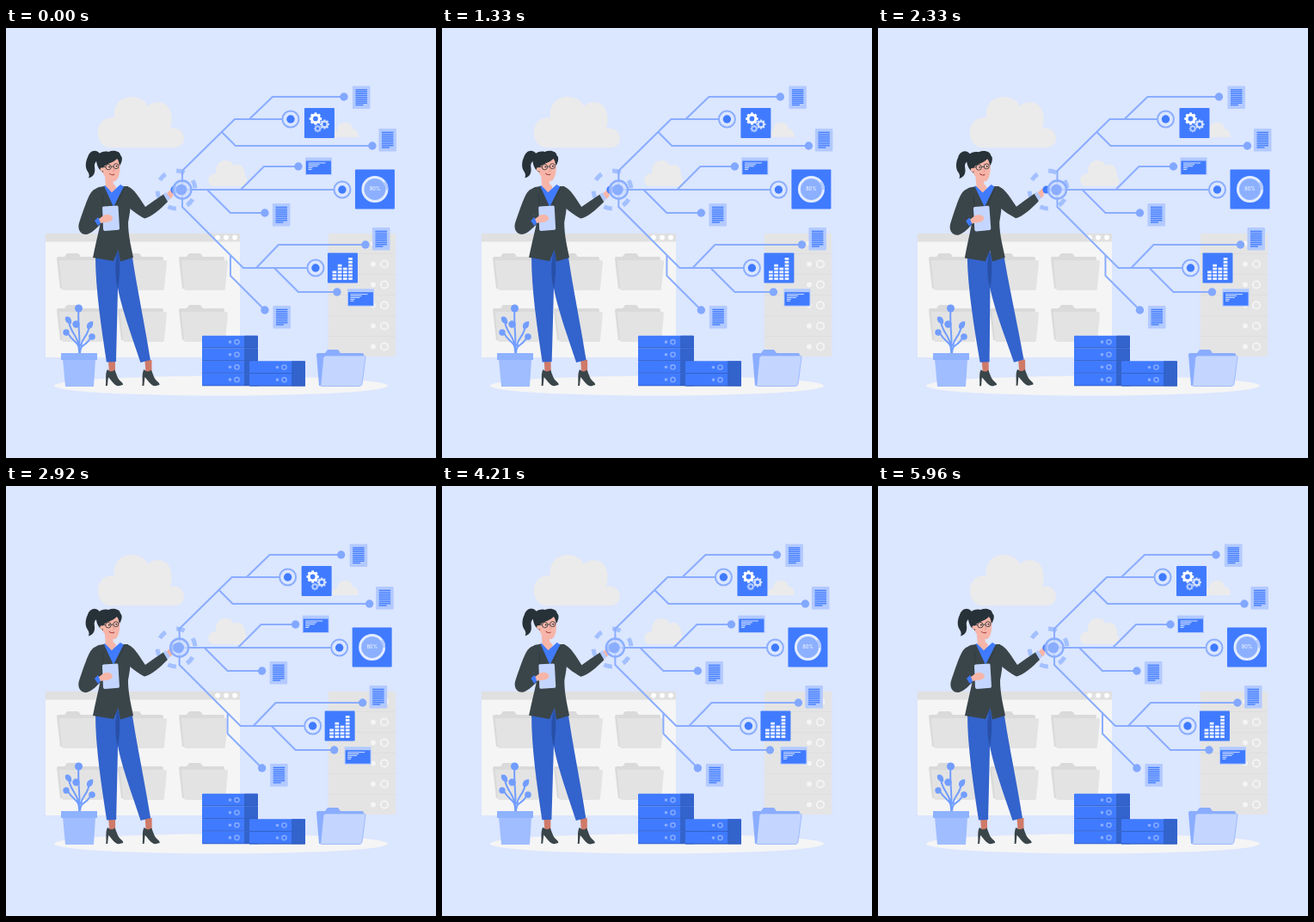
An HTML page with a canvas for the animation above (6 s loop, 500x500 px).

```html
<!DOCTYPE html>
<html lang="en">
<head>
<meta charset="utf-8">
<title>Data network</title>
<style>
html, body { margin: 0; width: 100%; height: 100%; overflow: hidden; background: #dbe6ff; }
canvas { display: block; width: 500px; height: 500px; }
</style>
</head>
<body>
<canvas id="stage"></canvas>
<script>
const canvas = document.getElementById('stage');
const ctx = canvas.getContext('2d');
const scale = Math.max(1, window.devicePixelRatio || 1);
canvas.width = canvas.height = 500 * scale;

const LOOP = 6000, LEAD = 30, TAU = Math.PI * 2;
const BLUE = '#407bff', DEEP = '#3363cc', LINE = '#8aadff', PALE = '#b3caff';
const BG = '#dbe6ff', DARK = '#3a454a', HAIR = '#263238', SKIN = '#f6b5a8';

// Keyframes are [position, value] pairs, joined by straight segments.
const SHAKE = [[0, 0], [.1, -1], [.2, 2], [.3, -4], [.4, 4], [.5, -4],
  [.6, 4], [.7, -4], [.8, 2], [.9, -1], [1, 0]];
const SWAY = [[0, 0], [.25, 1], [.75, -1], [1, 0]];

function track(keys, p) {
  let i = 1;
  while (keys[i][0] < p) i++;
  const [a, u] = keys[i - 1], [b, v] = keys[i];
  return u + (v - u) * (p - a) / (b - a);
}

function rect(x, y, w, h, color, r = 0) {
  ctx.fillStyle = color;
  ctx.beginPath();
  ctx.roundRect(x, y, w, h, r);
  ctx.fill();
}
function disc(x, y, r, color) {
  ctx.fillStyle = color;
  ctx.beginPath();
  ctx.arc(x, y, r, 0, TAU);
  ctx.fill();
}
function arc(x, y, r, color, w, from = 0, to = TAU) {
  ctx.strokeStyle = color;
  ctx.lineWidth = w;
  ctx.beginPath();
  ctx.arc(x, y, r, from, to);
  ctx.stroke();
}
function fill(d, color) {
  ctx.fillStyle = color;
  ctx.fill(new Path2D(d));
}
function stroke(d, color, w) {
  ctx.strokeStyle = color;
  ctx.lineWidth = w;
  ctx.stroke(new Path2D(d));
}
function at(x, y, draw) {
  ctx.save();
  ctx.translate(x, y);
  draw();
  ctx.restore();
}

function clouds() {
  fill('M120 139C111 138 106 129 107 119C108 109 116 103 126 104C124 90 133 80 146 80C155 80 162 84 165 91C171 85 181 85 187 90C193 96 194 107 191 117C200 115 207 121 207 129C207 135 202 139 196 139Z', '#ebebeb');
  fill('M241 184C234 183 233 172 240 170C241 169 243 169 244 169C243 160 248 154 255 154C260 154 263 156 265 160C271 156 279 161 278 173C282 175 281 184 276 184Z', '#ebebeb');
  fill('M379 127C378 121 382 119 385 119C385 113 390 109 396 110C400 110 402 113 403 117C407 117 410 121 410 127Z', '#ebebeb');
}

function greyFolder(x, y) {
  at(x, y, () => {
    fill('M0 6Q0 4 2 4H9L12 0H25L28 4H51Q53 4 53 6L51 41H4Z', '#dadada');
    fill('M4 8H55Q57 8 57 10L54 41Q54 43 52 43H8Q6 43 6 41L3 10Q2 8 4 8Z', '#e3e3e3');
  });
}

function backWindow() {
  rect(46, 239, 226, 144, '#f5f5f5');
  rect(46, 239, 226, 9.5, '#e0e0e0');
  for (const x of [246, 256, 266]) disc(x, 243.6, 2.9, '#fff');
  for (const y of [262, 322])
    for (const x of [59, 130, 201]) greyFolder(x, y);
}

function cabinet() {
  rect(375, 239, 78, 143, '#e4e4e4');
  for (let i = 0; i < 6; i++) {
    const y = 250.5 + i * 24;
    if (i) rect(375, y - 12.3, 78, .7, '#dcdcdc');
    disc(427, y, 2.9, '#f5f5f5');
    arc(440, y, 4.2, '#f5f5f5', 1.8);
  }
}

function server(x, y) {
  rect(x, y, 65, 14.4, BLUE, 1);
  rect(x + 49, y, 16, 14.4, DEEP, 1);
  rect(x, y + 13.8, 65, .9, '#2d59b8');
  disc(x + 32.5, y + 7.3, 1.8, LINE);
  arc(x + 40.5, y + 7.3, 2.6, LINE, 1.4);
}

function servers() {
  for (let i = 0; i < 4; i++) server(228, 357.8 + i * 14.6);
  for (let i = 0; i < 2; i++) server(283, 387.2 + i * 14.6);
}

function blueFolder() {
  fill('M361 380Q361 378 363 378H371L374 374H386L389 378H414Q416 378 416 380L412 416H364Z', LINE);
  fill('M372 381H416Q418 381 418 383L414 414Q413 416.5 411 416.5H367Q365 416.5 366 414L369 383Q370 381 372 381Z', '#c4d6ff');
  stroke('M372 381H416Q418 381 418 383L414 414Q413 416.5 411 416.5H367Q365 416.5 366 414L369 383Q370 381 372 381Z', LINE, .7);
}

function plant() {
  const c = '#729dff';
  stroke('M85 379C87 362 83 344 84.5 327M85 376C85 364 79 367 72 355M85 372C84 358 75 355 73 341M86 378C87 366 92 371 98 361M87 370C89 358 95 360 97 346', c, 2);
  disc(84.5, 326, 4.5, c);
  disc(70, 354, 3.7, c);
  disc(81.5, 344.5, 4.2, c);
  disc(100, 359, 3.8, c);
  fill('M69 336C74 334 77 338 76 344C71 344 68 341 69 336Z', c);
  fill('M101 341C95 341 92 346 95 350C100 350 102 346 101 341Z', c);
  fill('M66 385H104L102 417H69Z', '#9fbdff');
  rect(64, 378, 42, 8, '#8fb2ff', .5);
}

function halo() {
  for (let i = 0; i < 6; i++) {
    const a = (-77 + i * 60) * Math.PI / 180;
    arc(198, 188, 22, '#a3c0ff', 5, a - .22, a + .22);
  }
}

function shoe(x) {
  at(x, 0, () => {
    fill('M119 386H127L127 400H120Z', '#cf7a69');
    fill('M118 397C115 402 117 410 116 416H118L119 406C123 410 126 416 131 416.3L136 415C137 412 131 411 129 404L126.5 397.5C124 400 121 400 118 397Z', DARK);
  });
}

function woman() {
  shoe(0);
  shoe(42.5);
  fill('M127 260L147 267C152 300 162 348 168 386L156.5 389C148 362 132 322 128 290Z', DEEP);
  fill('M104 266L131 258C130 305 129 350 128 388L117 388.5C111 350 104 303 104 266Z', DEEP);
  fill('M130 259C133 268 133 285 130 303C127 292 126 273 130 259Z', '#2850a8');

  // reaching hand and sleeve
  fill('M184 195C188 192 190 188 194 187L198 188L194 194C195 197 189 199 188 201Z', SKIN);
  fill('M182 194L186 191L191 198L187 202Z', PALE);
  fill('M137 184C146 183 151 191 162 208C169 203 176 198 183 193.5L188 202C179 211 169 220 161 221.5C151 216 143 210 138 203Z', DARK);

  // neck, shirt, jacket
  fill('M115 173H124L125 183L128 185L123 198L113 185L116 183Z', SKIN);
  fill('M107 188L115 183L123 191L133 182L138 185L139 230H110Z', BLUE);
  fill('M123 191L128 185L126 182L116 183Z', SKIN);
  fill('M108 185L114 184L125 208L137 184L142 184C147 194 145 211 142 226C142 242 146 256 148 267L133 271.5L130.5 258L125 271L101 267C104 252 107 240 110 226C104 216 97 188 108 185Z', DARK);
  fill('M108 186C98 187 96 195 85.5 225C82 234 87 241 94 240C101 238 107 231 112 226L106 217L111 203Z', DARK);
  stroke('M112 193C114 205 112 218 110 227M137 187L126 211', '#2c373c', .7);
  fill('M103 224L107 220L111 226L107 230Z', BLUE);

  // tablet and holding hand
  fill('M112 209Q112 207.5 113.5 207.5L129 206.5Q130.5 206.5 130.5 208L132 233Q132 234.7 130.5 234.8L115 236Q113.3 236 113 234.3Z', '#c4d6ff');
  fill('M108 222L114 217.5C119 216 124 218 124 221C124 225 118 226 114 226L110 227Z', SKIN);

  // ponytail, face, fringe
  fill('M109 146C104 140 97 143 95 150C92 156 92 163 95 167C97 170 97 172 96 174.5C102 173 104 168 103 162C102 156 106 154 109 153Z', HAIR);
  fill('M110 153C113 147 126 146 131 151C134 162 132 175 127 178C120 179 113 173 111 164Z', SKIN);
  fill('M105 155C104 147 112 142 119 144C126 141 133 144 133 148C136 150 135 156 132 160C131 156 131 154 129 152C123 158 117 157 113 162L113 168C108 165 106 161 105 155Z', HAIR);
  disc(111.7, 164.5, 2.3, SKIN);
  arc(119, 161.7, 3.2, HAIR, .8);
  arc(128, 160.7, 3, HAIR, .8);
  stroke('M112 161.5L116 161.5M122 161.3L125 161', HAIR, .8);
  disc(120, 161.5, .9, HAIR);
  disc(128.5, 160.7, .9, HAIR);
  stroke('M124 162L126 166L124 167', '#d98f82', .7);
  stroke('M120 169Q123 172 126 170', '#a94444', 1);
}

function doc(x, y) {
  rect(x, y, 20.5, 26.5, PALE, 1);
  for (let i = 0; i < 9; i++)
    rect(x + 3.5, y + 3.7 + i * 2.2, i < 8 ? 13.5 : 9, 1.35, BLUE);
}

function terminal(x, y) {
  rect(x, y, 31, 20.5, PALE, .5);
  rect(x + 1, y + 4, 29, 15.5, BLUE);
  [20, 13, 11, 5, 4].forEach((w, i) =>
    rect(x + 3.5, y + 6 + i * 1.9, w, .9, '#e4edff'));
}

function gear(x, y, r, color) {
  at(x, y, () => {
    for (let i = 0; i < 8; i++) {
      ctx.rotate(TAU / 8);
      rect(-r * .19, -r, r * .38, r * .5, color);
    }
    arc(0, 0, r * .61, color, r * .42);
  });
}

function gearTile() {
  rect(347, 93, 35, 35, BLUE, 1);
  gear(360, 105.5, 7.2, '#fff');
  gear(370.5, 112, 5.5, '#d3e0ff');
  gear(362.5, 117, 4.3, PALE);
}

function barTile() {
  rect(374, 261.5, 35, 35, BLUE, 1);
  [3, 5, 4, 7].forEach((n, c) => {
    for (let i = 0; i < n; i++)
      rect(379.6 + c * 6.2, 290.2 - i * 3.85, 4.7, 2.7, '#f2f6ff');
  });
}

function percentTile() {
  rect(406, 164.5, 46, 46, BLUE, 1);
  disc(429, 187.5, 13, '#8cb0ff');
  arc(429, 187.5, 14, '#e3ecff', 3);
  arc(429, 187.5, 14, PALE, 3, -.65, .05);
  ctx.fillStyle = '#fff';
  ctx.font = '5.6px Inter, Arial, sans-serif';
  ctx.textAlign = 'center';
  ctx.textBaseline = 'middle';
  ctx.fillText('80%', 429, 187.8);
}

function ringNode(x, y) {
  disc(x, y, 9.5, BG);
  arc(x, y, 9.5, LINE, 2);
  disc(x, y, 4.7, BLUE);
}

function network() {
  const wires = [
    'M205 188V166L266 106H321', 'M283 106L310 80H393', 'M251 121L267 137H426',
    'M205 188H381', 'M273 188L300 161H340', 'M234 188L261 215H301',
    'M205 188V208L276 279H350', 'M291 279L317 252H418',
    'M312 279L340 307H385', 'M261 264V288L301 328'
  ];
  stroke(wires.join(''), LINE, 2);
  const ends = [[393, 80], [426, 137], [340, 161], [301, 215], [418, 252], [385, 307], [301, 328]];
  for (const [x, y] of ends) disc(x, y, 4.7, '#82a8ff');
  for (const [x, y] of [[331, 106], [391, 188], [360, 279]]) ringNode(x, y);

  disc(205, 188, 10.5, 'rgba(205,220,255,.75)');
  arc(205, 188, 10.5, LINE, 2.4);
  disc(204, 188, 6.3, LINE);

  const docs = [[403, 67.5], [433.5, 117], [310, 204], [426, 232], [310.5, 323]];
  for (const [x, y] of docs) doc(x, y);
  terminal(348, 150.5);
  terminal(397, 303.2);
  gearTile();
  barTile();
  percentTile();
}

function draw(ms) {
  const p = (ms + LEAD) % LOOP / LOOP;
  ctx.setTransform(scale, 0, 0, scale, 0, 0);
  ctx.lineJoin = 'round';
  rect(0, 0, 500, 500, BG);
  clouds();
  backWindow();
  cabinet();
  ctx.fillStyle = '#f5f5f5';
  ctx.beginPath();
  ctx.ellipse(250, 416, 194, 11.5, 0, 0, TAU);
  ctx.fill();
  servers();
  blueFolder();
  plant();
  halo();
  at(140, 280, () => {
    ctx.rotate(track(SWAY, p * 2 % 1) * Math.PI / 180);
    ctx.translate(-140, -280);
    woman();
  });
  disc(196, 188, 4.6, BLUE);
  at(track(SHAKE, p), 0, network);
}

const start = performance.now();
function tick() {
  draw(performance.now() - start);
  requestAnimationFrame(tick);
}
tick();
</script>
</body>
</html>
```
